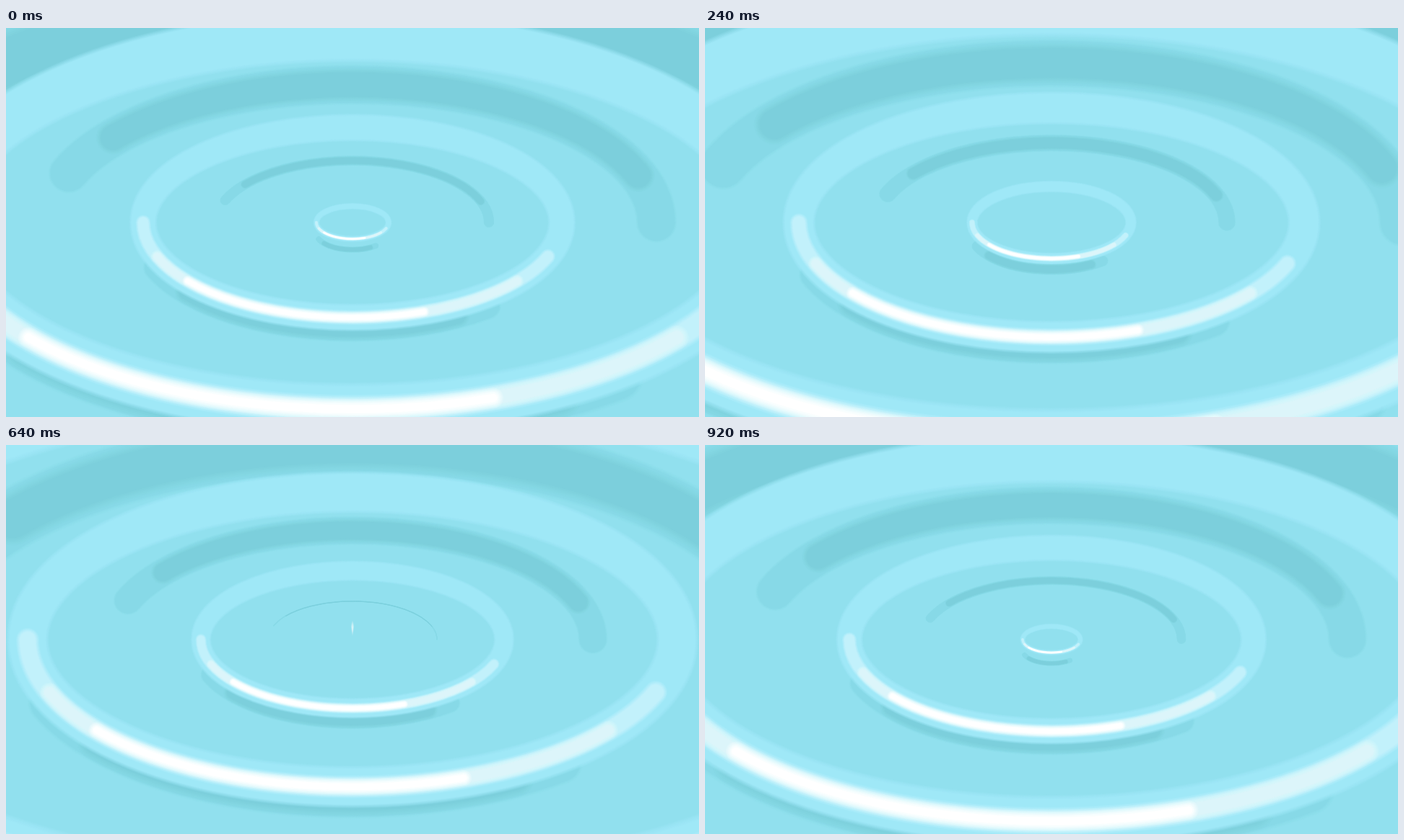
An HTML page with a canvas that plays this animation: 960 by 540 pixels, repeating every 0.96 s.

```html
<!DOCTYPE html>
<html lang="en">
<head>
<meta charset="utf-8">
<title>Ripples</title>
<style>
  html, body { margin: 0; width: 100%; height: 100%; overflow: hidden; background: #91e0ee; }
  canvas { display: block; width: 960px; height: 540px; }
</style>
</head>
<body>
<canvas id="stage" width="960" height="540"></canvas>
<script>
const ctx = document.getElementById('stage').getContext('2d');
const LOOP = 960, STEP = 40, CX = 480, CY = 270, RATIO = 1 / 2.2;
const BEND = 1600; // time at which a ripple speeds up
const COLOR = {
  water: '#91e0ee', crest: '#9fe8f7', shade: '#87d9e7', dark: '#7ccfdc',
  pale: '#c2f1fb', bright: '#dcf5fa', white: '#ffffff'
};

// Distance covered at one speed up to the bend and another after it.
const travel = (t, start, slow, fast) =>
  slow * (Math.min(t, BEND) - start) + fast * Math.max(0, t - BEND);

// Elliptical stroke whose edge fades from width `outer` to width `inner`.
function arc(color, rx, cy, from, to, outer, inner, alpha = 1) {
  const n = 6;
  ctx.strokeStyle = color;
  for (let i = 0; i < n; i++) {
    ctx.globalAlpha = alpha / (n - i);
    ctx.lineWidth = outer + (inner - outer) * i / (n - 1);
    ctx.beginPath();
    ctx.ellipse(CX, cy, rx, rx * RATIO, 0, from * Math.PI / 180, to * Math.PI / 180);
    ctx.stroke();
  }
  ctx.globalAlpha = 1;
}

// Dark trough behind the crest, on the far side.
function trough(t) {
  const rx = travel(t, 120, 0.225, 0.275);
  const w = 0.175 * (rx - 110);
  if (w <= 0) return;
  arc(COLOR.shade, rx, CY, 201, 360, w * 1.04, w * 0.92);
  arc(COLOR.dark, rx, CY, 218, 340, w * 0.86, w * 0.62);
}

// Shadow below the crest, on the near side.
function shadow(rx) {
  const w = 0.12 * rx + 2, alpha = Math.min(1, rx / 32);
  arc(COLOR.shade, rx, CY + 15, 50, 159, w * 1.06, w * 0.9, alpha);
  arc(COLOR.dark, rx, CY + 15, 60, 142, w * 0.96, w * 0.62, alpha);
}

function crest(rx) {
  arc(COLOR.crest, rx, CY, 0, 360, 0.125 * rx + 3, 0.108 * rx + 1);
  arc(COLOR.pale, rx, CY, 21, 180, 0.068 * rx + 1.5, 0.046 * rx + 1);
  arc(COLOR.bright, rx, CY, 38, 159, 0.058 * rx + 1, 0.03 * rx + 1);
  arc(COLOR.white, rx, CY, 70, 142, 0.048 * rx + 1, 0.018 * rx + 1);
}

function drop(t) {
  const s = (720 - t) / 320;
  if (t < 280 || s < 0) return;
  const y = CY - 195 * s ** 1.826;
  const h = 54 * s ** 0.67, w = 16 * s;
  ctx.fillStyle = COLOR.white;
  if (s === 0) {
    ctx.globalAlpha = 0.5;
    ctx.fillRect(CX - 1, CY - 1, 2, 2);
  }
  for (let i = 0; i < 5; i++) {
    const k = 1 - i * 0.17, hw = w * k / 2, hh = h * k / 2;
    ctx.globalAlpha = 0.2;
    ctx.beginPath();
    ctx.moveTo(CX, y - hh);
    ctx.quadraticCurveTo(CX + hw * 0.7, y - hh * 0.8, CX + hw, y - hh * 0.3);
    ctx.quadraticCurveTo(CX + hw * 0.8, y + hh * 0.4, CX, y + hh);
    ctx.quadraticCurveTo(CX - hw * 0.8, y + hh * 0.4, CX - hw, y - hh * 0.3);
    ctx.quadraticCurveTo(CX - hw * 0.7, y - hh * 0.8, CX, y - hh);
    ctx.fill();
  }
  ctx.globalAlpha = 1;
}

function draw(t) {
  ctx.fillStyle = COLOR.water;
  ctx.fillRect(0, 0, 960, 540);
  ctx.lineCap = 'round';
  const times = [3, 2, 1, 0, -1].map(k => t + k * LOOP);
  const radii = times.map(u => travel(u, -200, 0.25, 0.375)).filter(r => r > 0);
  times.forEach(trough);
  radii.forEach(shadow);
  radii.forEach(crest);
  drop(t);
}

const begin = performance.now();
let shown = -1;
function tick() {
  const t = Math.floor(((performance.now() - begin) % LOOP) / STEP) * STEP;
  if (t !== shown) draw(shown = t);
  requestAnimationFrame(tick);
}
tick();
</script>
</body>
</html>
```
